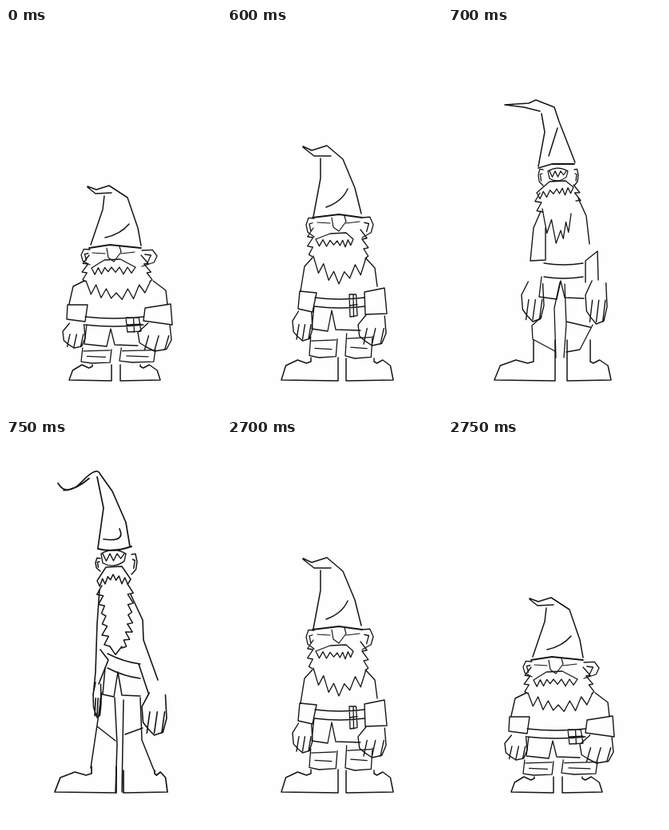
Recreate the animation shown at these times as an HTML page. Size 269 by 480 pixels, loop 3300 ms.

```html
<!DOCTYPE html>
<html lang="en">
<head>
<meta charset="utf-8">
<title>Stretching gnome</title>
<style>
html, body { margin: 0; width: 100%; height: 100%; overflow: hidden; background: #fefefe; }
svg { display: block; width: 100%; height: 100%; }
path { fill: none; stroke: #161616; stroke-linecap: round; stroke-linejoin: round; }
</style>
</head>
<body>
<svg id="stage" viewBox="0 0 269 480"></svg>
<script>
const short = {
  hat: 'M102 198L113 202 129 197 152 212 165 250 169 272M102 199L112 207 132 206M123 210L121 227 106 271M124 262Q143 258 154 245',
  brim: 'M104 275L130 271 169 275',
  nose: [135, 283],
  ears: [[105, 277, -11, 19], [170, 278, 19, 20]],
  sides: [[104, 284, 100, 317], [169, 284, 180, 317]],
  beard: [100, 316, 138, 331, 181, 316], tufts: 6, drop: 12,
  moustache: [107, 300, 132, 299, 162, 299],
  arms: 'M98 316L84 323 79 345M77 346L102 346 99 367 76 364ZM184 316L200 328 202 346M174 350L206 345 208 371 172 366Z',
  hands: [[71, 369, 28, 31], [165, 369, 42, 35]],
  belt: [99, 172, 361, 10], pouch: [150, 362, 19, 18], skirt: [98, 131, 165, 397],
  cuffs: [[94, 400, 38, 19], [142, 400, 45, 18]],
  boots: [[132, 79, 108, 421], [143, 193, 168, 421]]
};

const rising = {
  hat: 'M95 148L106 153 125 147 145 164 160 200 168 232M95 149L109 160 130 160M117 163L117 188 108 236M124 224Q144 217 151 201',
  brim: 'M107 237L140 233 169 237',
  nose: [140, 245],
  ears: [[109, 238, -10, 23], [169, 237, 14, 25]],
  sides: [[108, 250, 107, 286], [167, 252, 173, 288]],
  beard: [108, 285, 140, 309, 174, 287], tufts: 5, drop: 14,
  moustache: [111, 264, 138, 266, 158, 264],
  arms: 'M107 287L97 298 92 329M91 329L112 331 107 355 89 351ZM174 288L185 300 188 323M172 330L197 325 200 357 173 358Z',
  hands: [[82, 354, 25, 37], [164, 358, 35, 39]],
  belt: [110, 172, 337, 11], pouch: [153, 333, 10, 28], skirt: [106, 131, 167, 378],
  cuffs: [[103, 386, 35, 26], [148, 382, 34, 31]],
  boots: [[139, 68, 105, 412], [149, 208, 184, 413]]
};

const tall = {
  hat: 'M71 96L101 94 110 90 133 99 139 117 159 168M71 96L95 99 115 104M117 107L121 130 113 173M137 125L126 160',
  brim: 'M113 175L130 170 158 170',
  goggles: [137.5, 182, 25],
  ears: [[119, 177, -6, 20], [158, 177, 5, 20]],
  sides: [[115, 206, 119, 230], [157, 196, 160, 216]],
  beard: [118, 226, 141, 253, 154, 232], tufts: 4, drop: 20,
  moustache: [111, 206, 136, 201, 157, 199],
  arms: 'M116 229L107 250 103 291 122 290M122 250L122 290M163 213L173 235 177 270M172 318L172 291 187 279 188 315',
  hands: [[92, 317, 28, 50], [172, 316, 27, 54]],
  belt: [120, 169, 294, 17], skirt: [114, 141, 170, 338],
  legs: 'M140 318L133 350 135 412M146 320L148 370 145 412M117 361L105 372 106 389 134 404M148 367L178 374M181 371L165 402 148 405',
  boots: [[134, 58, 107, 390], [149, 204, 178, 390]]
};

const full = {
  hat: 'M65 54Q76 72 95 52T118 43L133 64 150 103 155 133M72 63Q88 62 104 48M114 46L122 85 115 135M122 124Q150 128 142 111',
  brim: 'M115 136Q135 141 157 133',
  goggles: [134.5, 146, 31],
  ears: [[118, 148, -6, 16], [157, 143, 7, 25]],
  sides: [[120, 182, 130, 258], [152, 180, 153, 225, 145, 260]],
  beard: [130, 258, 137, 260, 145, 258], tufts: 1, drop: 7,
  moustache: [114, 176, 134, 168, 156, 174],
  arms: 'M117 187L114 230 112 290 109 320M118 262L128 275 116 305M156 193L171 225 172 250 190 300M166 280L178 316',
  hands: [[109, 303, 10, 44], [170, 316, 31, 53]],
  belt: [127, 168, 267, 18, 13], skirt: [121, 140, 168, 320],
  legs: 'M120 316L106 410M136 322L139 380 137 440M147 325L145 440M114 358L137 376M168 322L170 375 186 415M149 368L171 360',
  boots: [[138, 61, 107, 408], [147, 202, 186, 413]]
};

const line = points => 'M' + points.map(p => p.join(' ')).join('L');
const inBox = ([x, y, w, h], points) => line(points.map(([u, v]) => [x + u * w, y + v * h]));

// zigzag along a guide line, every second point pulled outwards
function fringe(guide, count, dx, dy) {
  const last = guide.length / 2 - 1;
  const points = [];
  for (let i = 0; i <= 2 * count; i++) {
    const t = i / (2 * count) * last;
    const k = Math.min(Math.floor(t), last - 1);
    const at = axis => guide[2 * k + axis] + (guide[2 * k + 2 + axis] - guide[2 * k + axis]) * (t - k);
    const pull = (i % 2) * (1 + 0.25 * Math.sin(i * 2.3));
    points.push([at(0) + dx * pull, at(1) + dy * pull]);
  }
  return line(points);
}

function side(guide, index) {
  const length = guide[guide.length - 1] - guide[1];
  return fringe(guide, Math.round(length / 12), index ? 6 : -6, 4);
}

const moustache = g => fringe(g, 6, 0, 7) + `M${g[0]} ${g[1]}L${g[2] - 9} ${g[3] - 9} ${g[2] + 11} ${g[3] - 10} ${g[4]} ${g[5]}`;
const nose = ([x, y]) => `M${x - 9} ${y - 8}l2 12 7 5 9 -12 -2 -7m-34 8l16 1m20 0l17 -2`;

function goggles([x, y, w]) {
  const half = w / 2, h = w / 4;
  return `M${x - half} ${y - h / 2}Q${x} ${y - 1.7 * h} ${x + half} ${y - h / 2}l-2 ${1.2 * h}Q${x} ${y + 2 * h} ${x - half + 2} ${y + h}Z`
    + fringe([x - half + 2, y - h / 2, x + half - 2, y - h / 2], 3, 0, h);
}

const ear = box => inBox(box, [[0, 0], [0.7, -0.03], [1, 0.35], [0.8, 0.75], [0, 1]])
  + inBox(box, [[0.2, 0.25], [0.6, 0.3], [0.4, 0.7]]);

const hand = box => inBox(box, [[0.3, 0], [0, 0.33], [0.05, 0.7], [0.25, 0.85], [0.5, 1], [0.85, 0.93], [1, 0.6], [0.95, 0.05]])
  + [0.2, 0.5, 0.8].map(u => inBox(box, [[u, 0.95], [u + 0.12, 0.45]])).join('');

const belt = ([x0, x1, y, h, tilt = 0]) => [0, h]
  .map(d => `M${x0} ${y + d}Q${(x0 + x1) / 2} ${y + d + tilt / 2 + 4} ${x1} ${y + d + tilt}`).join('');

const pouch = box => inBox(box, [[0, 0], [0.1, 1], [1, 0.95], [0.85, 0], [0, 0]])
  + inBox(box, [[0.05, 0.5], [1, 0.45]]) + inBox(box, [[0.5, 0], [0.55, 1]]);

const skirt = ([x0, mid, x1, y], [, , top, h]) =>
  `M${x0 + 3} ${top + h}L${x0} ${y - 2} ${mid - 5} ${y + 1} ${mid} ${top + h + 5} ${mid + 5} ${y - 1} ${x1} ${y}`;

const cuff = box => inBox(box, [[0.05, 0], [0, 0.9], [0.35, 1], [0.95, 0.95], [1, 0.1]])
  + inBox(box, [[0.08, 0.2], [0.95, 0.15]]) + inBox(box, [[0.2, 0.55], [0.8, 0.6]]);

function boot([heel, toe, ankle, top]) {
  const reach = toe - ankle, y = Math.max(top, 415);
  return line([[ankle, top], [ankle, y + 2], [ankle + reach * 0.15, y + 4], [ankle + reach * 0.45, y],
    [toe - reach * 0.15, y + 7], [toe, 440], [heel, 441], [heel, top]]);
}

const each = (items, rule) => (items || []).map(rule).join('');

function strokes(p) {
  return [
    [1.5, p.hat],
    [1.8, p.brim],
    [1.2, p.nose ? nose(p.nose) : goggles(p.goggles)],
    [1.3, each(p.ears, ear) + each(p.sides, side) + moustache(p.moustache)],
    [1.3, fringe(p.beard, p.tufts, 0, p.drop)],
    [1.4, p.arms + each(p.hands, hand)],
    [1.3, belt(p.belt) + skirt(p.skirt, p.belt) + (p.pouch ? pouch(p.pouch) : '')],
    [1.3, (p.legs || '') + each(p.cuffs, cuff)],
    [1.5, each(p.boots, boot)]
  ];
}

const stage = document.getElementById('stage');
function svgNode(tag, attrs, parent) {
  const node = document.createElementNS('http://www.w3.org/2000/svg', tag);
  for (const key in attrs) node.setAttribute(key, attrs[key]);
  return parent.appendChild(node);
}

const groups = new Map();
for (const pose of [short, rising, tall, full]) {
  const group = svgNode('g', { visibility: 'hidden' }, stage);
  for (const [width, d] of strokes(pose)) {
    svgNode('path', { d, 'stroke-width': pose === full ? width * 1.15 : width }, group);
  }
  groups.set(pose, group);
}

// start time, pose, height relative to the drawn pose
const LOOP = 3300;
const STEPS = [
  [0, short, 1], [600, rising, 1], [650, tall, 0.925], [700, tall, 1],
  [750, full, 1], [2600, tall, 1], [2650, tall, 0.925], [2700, rising, 1], [2750, short, 1]
];
const GROUND = 441;

const start = performance.now();
function draw(now) {
  const time = Math.max(0, now - start) % LOOP;
  const [, current, height] = STEPS.filter(step => step[0] <= time).pop();
  for (const [pose, group] of groups) {
    group.setAttribute('visibility', pose === current ? 'visible' : 'hidden');
  }
  groups.get(current).setAttribute('transform', `matrix(1 0 0 ${height} 0 ${GROUND * (1 - height)})`);
  requestAnimationFrame(draw);
}
draw(start);
</script>
</body>
</html>
```
